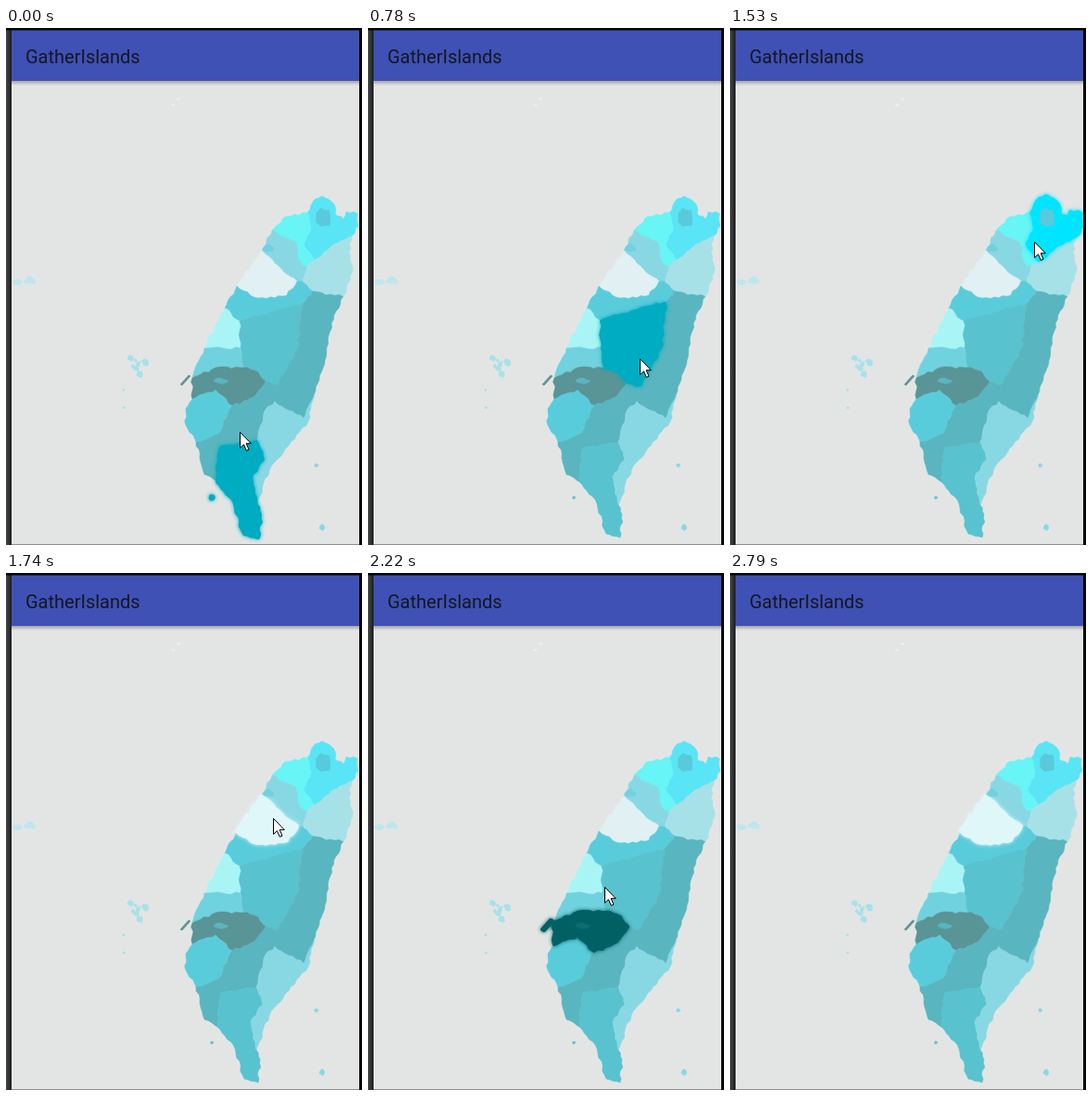
Recreate the animation shown at these times as an HTML page. Size 384 by 557 pixels, loop 3.03 s.

```html
<!DOCTYPE html>
<html lang="en">
<head>
<meta charset="utf-8">
<title>Island map</title>
<style>
  html, body { margin: 0; width: 100%; height: 100%; overflow: hidden; background: #e3e5e5; }
  svg { display: block; width: 384px; height: 557px; }
  text { font: 20px Roboto, Arial, sans-serif; fill: #15171f; }
  path { stroke-linejoin: round; }
  #land path, #insets path { stroke-width: .6; }
  #glow { stroke-width: 4; }
</style>
</head>
<body>
<svg viewBox="0 0 384 557">
  <defs>
    <linearGradient id="edge">
      <stop stop-color="#454648"/><stop offset="1" stop-color="#1c1d1f"/>
    </linearGradient>
    <linearGradient id="shade" x2="0" y2="1">
      <stop stop-opacity=".28"/><stop offset="1" stop-opacity="0"/>
    </linearGradient>
  </defs>
  <rect width="384" height="557" fill="#e3e5e5"/>
  <g id="land"></g>
  <path id="glow"/>
  <g id="insets"></g>
  <rect x="6" y="57" width="375" height="5" fill="url(#shade)"/>
  <rect x="6" width="375" height="57" fill="#3f51b5"/>
  <text x="21" y="38">GatherIslands</text>
  <rect y="556" width="384" height="1" fill="#8d8f90"/>
  <rect width="6" height="557" fill="url(#edge)"/>
  <rect width="384" height="2.500" fill="#050506"/>
  <rect x="381" width="3" height="557" fill="#050506"/>
  <path id="cursor" d="M.5 .5V17.500L4.500 13.800L7.300 20.300L10 19.200L7.200 12.700H12.300Z" fill="#fff" stroke="#000"/>
</svg>
<script>
const LOOP = 3030, TICK = 30;
const $ = id => document.getElementById(id);

// Key points, one letter each: the coast clockwise, then the inner borders
const coast = `A287,218 B302,203 C325,199 D331,187 E341,181 F354,190 G355,200 H364,206 I367,198
  J379,200 K380,213 L373,224 M370,242 N374,262 O364,289 P351,318 Q344,358 R334,387 S326,424
  T305,450 U284,477 V270,514 W274,524 X272,549 Y257,545 Z245,508 0228,489 1214,481 2205,446
  3194,428 4194,410 5201,400 6201,377 7214,345 8236,302 9249,278`;
const inner = `a276,240 b297,260 c314,273 d321,274 e325,257 f333,250 g321,232 h329,215 i317,252
  j312,230 k299,225 l350,236 m331,283 n320,297 o290,305 p252,316 q253,345 r256,366 s231,365
  t280,381 u268,369 v294,384 w315,345 x268,397 y290,402 z321,420 α244,407 β303,288 γ272,291
  δ226,390 ε230,437 ζ278,415 η270,446 θ232,452 κ277,465 λ264,484`;
const nodes = Object.fromEntries(`${coast} ${inner}`.split(/\s+/)
  .map(s => [s[0], s.slice(1).split(',').map(Number)]));

const noise = n => {
  const v = Math.sin(n * 12.9898) * 43758.5453;
  return v - Math.floor(v) - .5;
};

// Ragged line from one key point to the next; both neighbours get the same line
function border(a, b) {
  if (a > b) return border(b, a).reverse();
  const [x0, y0] = nodes[a], [x1, y1] = nodes[b];
  const dx = x1 - x0, dy = y1 - y0, length = Math.hypot(dx, dy);
  const steps = Math.ceil(length / 5);
  const seed = a.charCodeAt() * 131 + b.charCodeAt();
  return Array.from({ length: steps + 1 }, (_, i) => {
    const k = i / steps, off = i % steps ? 3 * noise(seed + i) / length : 0;
    return [x0 + dx * k - dy * off, y0 + dy * k + dx * off];
  });
}

const toPath = points => 'M' + points.map(p => p.map(v => v.toFixed(1))).join('L') + 'Z';
const area = keys => toPath([...keys].flatMap((key, i) => border(key, keys[(i + 1) % keys.length])));

// Ragged islet
const islet = (x, y, rx, ry = rx) => toPath(Array.from({ length: 9 }, (_, i) => {
  const a = i / 9 * 2 * Math.PI, r = 1 + .6 * noise(x + y + i);
  return [x + rx * r * Math.cos(a), y + ry * r * Math.sin(a)];
}));

// Islets thinning out from a centre
const scatter = (x, y, count) => Array.from({ length: count }, (_, i) =>
  islet(x + 18 * noise(i + 1), y + 24 * noise(i + 50), 1 + 2.5 * (1 - i / count))).join('');

// name: [full colour, outline]; resting regions are a tint of the full colour
const regions = {
  north: ['#00e5ff', area('CDEFGHIJKLlfgh')],
  northwest: ['#18ffff', area('ABChgfeijk')],
  hills: ['#4dd0e1', area('Akjiedcba')],
  pale: ['#e0f7fa', area('abcβγ9')],
  midwest: ['#00bcd4', area('9γβcdmnop8')],
  plain: ['#84ffff', area('8pq7')],
  center: ['#00acc1', area('ponwvturq')],
  delta: ['#26c6da', area('7qrs6')],
  dark: ['#006064', area('6srutxαδ5') + 'M188 384L197 374 199 375 190 385Z'],
  southwest: ['#00bcd4', area('5δαε234')],
  ridge: ['#0097a7', area('2εαxtvyζηθ01')],
  south: ['#00acc1', area('θηκλVWXYZ0') + islet(222, 506, 1.5)],
  southeast: ['#4dd0e1', area('RSTUVλκηζyz') + islet(335, 471, 2) + islet(341, 538, 3.5)],
  east: ['#0097a7', area('mOPQRzyvwn')],
  northeast: ['#80deea', area('LMNOmdefl')],
  westIsles: ['#80deea', scatter(143, 365, 9) + islet(127, 390, 1.3) + islet(127, 409, 1.3)],
  farIsles: ['#a6e9f2', islet(13, 274, 5, 3) + islet(26, 272, 6, 4)],
  tinyIsles: ['#f4f6f6', islet(180, 83, 2, 1) + islet(186, 76, 2, 1)]
};
const insets = {
  basin: ['#00b8d4', islet(343, 204, 7, 11)],
  port: ['#26c6da', islet(283, 237, 6, 4)],
  town: ['#0097a7', islet(231, 380, 7, 3)]
};

// [time, selected region]
const picks = [[0, 'south'], [270, 'southwest'], [660, 'center'], [960, 'east'], [1140, 'northeast'],
  [1380, 'north'], [1680, 'pale'], [2040, 'dark'], [2400, 'pale']];

// [time, x, y] of the pointer tip
const track = [[0, 252, 435], [110, 283, 405], [270, 218, 418], [390, 237, 386], [540, 237, 386],
  [750, 293, 356], [840, 293, 356], [1050, 368, 300], [1200, 371, 273], [1440, 345, 215],
  [1740, 288, 264], [2040, 235, 385], [2220, 255, 338], [2430, 285, 268], [2550, 314, 330],
  [2670, 300, 418], [2790, 290, 560], [LOOP, 290, 560]];

function build(group, shapes) {
  for (const [name, [color, d]] of Object.entries(shapes)) {
    const path = document.createElementNS('http://www.w3.org/2000/svg', 'path');
    path.id = name;
    path.setAttribute('d', d);
    path.style.fill = path.style.stroke = `color-mix(in srgb, ${color} 61%, #e3e5e5)`;
    group.append(path);
  }
}

function select(name) {
  const [color, d] = regions[name], glow = $('glow');
  glow.setAttribute('d', d);
  glow.style.fill = glow.style.stroke = color;
  glow.style.filter = `drop-shadow(0 0 2px ${color})`;
  $('town').style.opacity = name === 'dark' ? .15 : 1;
}

function pointer(t) {
  const i = track.findIndex(p => p[0] > t);
  const [t0, x0, y0] = track[i - 1], [t1, x1, y1] = track[i];
  const k = (t - t0) / (t1 - t0);
  return [x0 + (x1 - x0) * k, y0 + (y1 - y0) * k];
}

function draw(now) {
  const t = Math.floor(Math.max(0, now - start) % LOOP / TICK) * TICK;
  select(picks.findLast(p => p[0] <= t)[1]);
  const [x, y] = pointer(t);
  $('cursor').setAttribute('transform', `translate(${Math.round(x)} ${Math.round(y)})`);
  requestAnimationFrame(draw);
}

build($('land'), regions);
build($('insets'), insets);
const start = performance.now();
draw(start);
</script>
</body>
</html>
```
